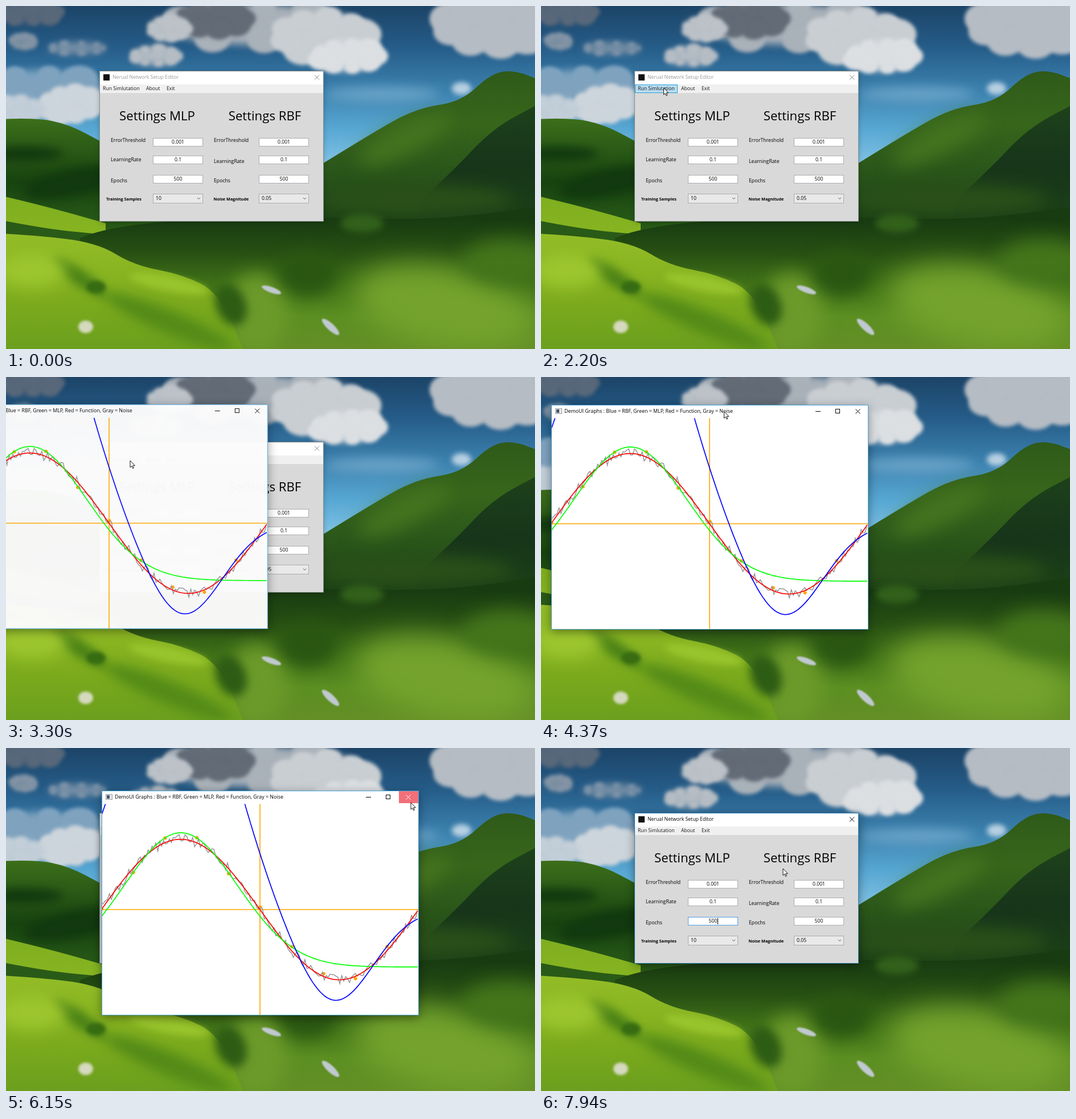
Recreate the animation shown at these times as an HTML page with a canvas. Size 929 by 603 pixels, loop 8 s.

```html
<!DOCTYPE html>
<html lang="en">
<head>
<meta charset="utf-8">
<title>Neural network settings</title>
<style>
html, body { margin: 0; width: 100%; height: 100%; overflow: hidden; }
canvas { display: block; }
</style>
</head>
<body>
<canvas id="stage" width="929" height="603"></canvas>
<script>
const W = 929, H = 603, LOOP = 8000;
const FONT = '"Open Sans", "Noto Sans", sans-serif';
const ctx = document.getElementById('stage').getContext('2d');

function random(seed) {
  return () => (seed = seed * 16807 % 2147483647) / 2147483647;
}

// ---- Landscape, painted once ----
function paintLandscape() {
  const canvas = document.createElement('canvas');
  canvas.width = W;
  canvas.height = H;
  const c = canvas.getContext('2d');
  const rnd = random(2024);

  const shade = (y0, y1, colors) => {
    const g = c.createLinearGradient(0, y0, 0, y1);
    colors.forEach((color, i) => g.addColorStop(i / (colors.length - 1), color));
    return g;
  };
  const patch = (color, x, y, rx, ry, angle = 0, blur = 8) => {
    c.filter = `blur(${blur}px)`;
    c.fillStyle = color;
    c.beginPath();
    c.ellipse(x, y, rx, ry, angle, 0, 7);
    c.fill();
  };
  // A soft base with a few smaller puffs spread over it.
  const cloud = (color, x, y, rx, ry) => {
    patch(color, x, y, rx * .85, ry * .75, 0, 7);
    for (let i = 0; i < 9; i++) {
      const a = i / 9 * 2 * Math.PI, r = ry * (.3 + .25 * rnd());
      patch(color, x + Math.cos(a) * rx * .75, y + Math.sin(a) * ry * .6, r * 1.3, r, 0, 3);
    }
  };
  // Land filled from a smooth skyline down to the bottom edge.
  const land = (colors, top, bottom, ...pts) => {
    c.filter = 'blur(.7px)';
    c.fillStyle = shade(top, bottom, colors);
    c.beginPath();
    c.moveTo(pts[0], H + 9);
    c.lineTo(pts[0], pts[1]);
    for (let i = 2; i < pts.length - 2; i += 2) {
      c.quadraticCurveTo(pts[i], pts[i + 1], (pts[i] + pts[i + 2]) / 2, (pts[i + 1] + pts[i + 3]) / 2);
    }
    c.lineTo(...pts.slice(-2));
    c.lineTo(pts.at(-2), H + 9);
    c.fill();
  };

  c.fillStyle = shade(0, 290, ['#1c4468', '#255c88', '#3b80ad', '#58a8d4', '#8ac8e8']);
  c.fillRect(0, 0, W, H);
  cloud('#7fa3bf', 60, 150, 120, 50);
  cloud('#cdd5dc', 115, 172, 55, 36);
  cloud('#c2ced8', 20, 182, 50, 26);
  cloud('#58687a', 40, 10, 65, 26);
  cloud('#8394a5', 30, 62, 24, 14);
  cloud('#7d93a8', 125, 74, 60, 13);
  cloud('#a9b1b9', 430, 32, 180, 48);
  cloud('#626b76', 365, 22, 70, 34);
  cloud('#b6bdc4', 262, 88, 48, 20);
  cloud('#bcc2c8', 285, 40, 38, 24);
  cloud('#c9ced2', 555, 50, 90, 52);
  cloud('#dcdfe2', 600, 88, 66, 34);
  cloud('#b5bcc4', 855, 34, 105, 56);
  patch('#6ba4c8', 660, 155, 100, 12, 0, 10);
  patch('#b7d0e2', 800, 145, 17, 11, 0, 4);

  land(['#2f5a19', '#37661b', '#29541a', '#1a3d14'], 115, 390,
    540, 287, 640, 225, 720, 180, 800, 168, 850, 120, 890, 112, 940, 131);
  patch('#45751f', 700, 235, 90, 24, -.45, 16);
  land(['#1e421b', '#17351a', '#1d4216'], 170, 390, 725, 345, 785, 290, 855, 215, 940, 170);
  patch('#2b5019', 720, 340, 170, 25, 0, 14);

  land(['#3c6e1a', '#2a5a16', '#17430f', '#245516', '#2c6016'], 198, 420,
    -10, 199, 50, 196, 110, 208, 170, 240, 300, 310);
  patch('#12390f', 30, 260, 70, 13);
  patch('#12390f', 120, 310, 90, 24, -.2);
  land(['#7fae1f', '#86b421'], 333, 400, -10, 333, 70, 352, 175, 382);
  land(['#2a5a17', '#2a5a17'], 370, 420, -10, 376, 70, 392, 175, 402);

  land(['#183b11', '#274f13', '#417218', '#5c8f22', '#648f26'], 375, 603,
    130, 408, 200, 378, 560, 372, 760, 376, 940, 352);
  patch('#32611b', 625, 382, 38, 16, 0, 6);
  patch('#6c9a2a', 440, 540, 55, 70, 0, 16);
  patch('#2a5612', 530, 470, 50, 40, 0, 14);
  patch('#74a22d', 770, 530, 160, 70, .2, 24);
  patch('#44751b', 880, 450, 80, 40, 0, 16);

  land(['#93bd27', '#88b421', '#78a81c', '#6b9f1e'], 400, 603,
    -10, 400, 50, 403, 160, 416, 225, 456, 310, 472, 375, 505, 420, 612);
  patch('#4c8317', 130, 478, 58, 14, .6);
  patch('#548b18', 285, 555, 120, 20, .4, 10);
  patch('#9dc62e', 45, 465, 60, 30, 0, 14);
  patch('#98c42c', 285, 488, 70, 13, .2, 6);
  patch('#376c13', 158, 494, 17, 11, 0, 3);
  patch('#2d5c14', 395, 525, 26, 38, -.4);

  patch('#c0c9cf', 466, 499, 18, 5, .35, 1);
  patch('#c0c9cf', 570, 564, 20, 6, .75, 1);
  patch('#d5d9be', 140, 564, 13, 11, 0, 2);
  return canvas;
}
const landscape = paintLandscape();

// ---- Drawing helpers ----
function text(str, x, y, { size = 8.7, color = '#000', align = 'left', bold = false } = {}) {
  ctx.font = `${bold ? 'bold ' : ''}${size}px ${FONT}`;
  ctx.textAlign = align;
  ctx.textBaseline = 'middle';
  ctx.fillStyle = color;
  ctx.fillText(str, x, y);
}

function box(x, y, w, h, fill, border) {
  ctx.fillStyle = fill;
  ctx.fillRect(x, y, w, h);
  if (border) outline(x, y, w, h, border);
}

function outline(x, y, w, h, color) {
  ctx.strokeStyle = color;
  ctx.lineWidth = 1;
  ctx.strokeRect(x + .5, y + .5, w - 1, h - 1);
}

function line(color, width, ...pts) {
  ctx.strokeStyle = color;
  ctx.lineWidth = width;
  ctx.beginPath();
  for (let i = 0; i < pts.length; i += 2) ctx.lineTo(pts[i], pts[i + 1]);
  ctx.stroke();
}

function cross(x, y, color) {
  line(color, 1, x - 4, y - 4, x + 4, y + 4);
  line(color, 1, x - 4, y + 4, x + 4, y - 4);
}

function frame(x, y, w, h, active) {
  ctx.save();
  ctx.shadowColor = `rgba(0,0,0,${active ? .4 : .22})`;
  ctx.shadowBlur = active ? 16 : 8;
  ctx.shadowOffsetY = active ? 4 : 2;
  box(x, y, w, h, '#fff');
  ctx.restore();
}

const inside = ([x, y], [bx, by, bw, bh]) => x >= bx && x < bx + bw && y >= by && y < by + bh;

// ---- Settings window ----
const FIELDS = [258, 444].flatMap(x =>
  [[232, '0.001'], [263, '0.1'], [297, '500']].map(([y, value]) => ({ rect: [x, y, 88, 15], value })));
const FOCUSED = FIELDS[2];
const RUN_ITEM = [165, 138, 75, 15];

function comboBox(x, value) {
  box(x, 330, 88, 17, '#e9e9e9', '#acacac');
  text(value, x + 5, 339);
  line('#555', 1, x + 78, 337, x + 80.5, 339.5, x + 83, 337);
}

function settingsWindow(t, cursor, hoverable) {
  const active = t >= 2430 && t < 3050 || t >= 7540;
  frame(164, 114, 394, 264, active);
  box(165, 138, 392, 15, '#f0f0f0');
  box(165, 153, 392, 225, '#d9d9d9');
  outline(164, 114, 394, 265, active ? '#2f7fae' : '#8a908d');
  box(171, 120, 11, 11, '#111');
  text('Nerual Network Setup Editor', 187, 126, { color: active ? '#000' : '#999' });
  cross(546, 125.5, active ? '#000' : '#888');

  if (hoverable && t < 2900 && inside(cursor, RUN_ITEM)) box(...RUN_ITEM, '#b9dcee', '#26a0da');
  text('Run Simlutation', 170, 146, { color: '#1a1a1a' });
  text('About', 246, 146, { color: '#1a1a1a' });
  text('Exit', 282, 146, { color: '#1a1a1a' });

  text('Settings MLP', 265.5, 195, { size: 22.2, align: 'center' });
  text('Settings RBF', 454.5, 195, { size: 22.2, align: 'center' });
  [[184, 270.5], [365, 273.5]].forEach(([x, rateY]) => {
    text('ErrorThreshold', x, 237);
    text('LearningRate', x, rateY);
    text('Epochs', x, 308);
  });
  text('Training Samples', 176, 340, { size: 7.3, bold: true });
  text('Noise Magnitude', 364.5, 340, { size: 7.3, bold: true });

  FIELDS.forEach(field => {
    const [x, y] = field.rect;
    const focus = field === FOCUSED && t >= 2430;
    const hover = hoverable && inside(cursor, field.rect);
    box(...field.rect, '#fff', focus ? '#569de5' : hover ? '#7eb4ea' : '#abadb3');
    text(field.value, x + 44, y + 7.5, { align: 'center' });
    if (focus) line('#000', 1, x + 52.5, y + 2, x + 52.5, y + 13);
  });
  comboBox(258, '10');
  comboBox(444, '0.05');
}

// ---- Graph window ----
const GW = 557, GH = 395, MID_X = 278, MID_Y = 209, AMP = 123.5;
const bell = (x, center, width) => Math.exp(-(((x - center) / width) ** 2));
const wave = x => MID_Y + AMP * Math.sin((x - MID_X) / GW * 2 * Math.PI);
const mlp = x => MID_Y + 101 - 236 * bell(x, 139, 141);
const rbf = x => MID_Y - 500 * bell(x, 131, 125) + 163 * bell(x, 408, 97);

function plot(fn, step) {
  const pts = [];
  for (let x = 0; x <= GW; x += step) pts.push(x, fn(x));
  return pts;
}
const noise = random(77);
const GRAPHS = [
  ['#959595', 1.5, ...plot(x => wave(x) + (noise() - .5) * 17, 3.4)],
  ['#f00', 1.7, ...plot(wave, 3)],
  ['#0f0', 1.7, ...plot(mlp, 3)],
  ['#00f', 1.7, ...plot(rbf, 3)],
];
const SAMPLE_ERRORS = [0, 8, -8, -9, 9, -5, -8, -5, 4, -7];

function graphWindow([x, y], alpha, scale, closeColor) {
  ctx.save();
  ctx.globalAlpha = alpha;
  ctx.translate(x + GW / 2, y + GH / 2);
  ctx.scale(scale, scale);
  ctx.translate(-GW / 2, -GH / 2);
  frame(0, 0, GW, GH, true);

  box(7, 6, 12, 10, '#e4e7ea', '#9aa0a6');
  box(9, 8, 5, 6, '#4a5568');
  text('DemoUI Graphs : Blue = RBF, Green = MLP, Red = Function, Gray = Noise', 23, 12, { size: 8.9 });
  line('#000', 1, 464, 11.5, 473, 11.5);
  outline(499, 7, 8, 8, '#000');
  if (closeColor) box(522, 0, 34, 22, closeColor);
  cross(538.5, 11.5, closeColor ? '#fff' : '#000');

  ctx.save();
  ctx.beginPath();
  ctx.rect(0, 23.5, GW, GH - 24);
  ctx.clip();
  line('#ffa500', 1.6, 0, MID_Y, GW, MID_Y);
  line('#ffa500', 1.6, MID_X, 23, MID_X, GH);
  ctx.fillStyle = '#ffa500';
  SAMPLE_ERRORS.forEach((error, i) => {
    const sx = i * GW / 10;
    ctx.beginPath();
    ctx.arc(sx, wave(sx) + error, 3, 0, 7);
    ctx.fill();
  });
  GRAPHS.forEach(graph => line(...graph));
  ctx.restore();

  outline(0, 0, GW, GH, '#4aa3d8');
  ctx.restore();
}

// ---- Motion ----
// Progress in n equal jumps; the first at t0, the last at t1.
function steps(t, t0, t1, n) {
  if (t < t0) return 0;
  return Math.min(1, (Math.floor((t - t0) / (t1 - t0) * (n - 1) + .01) + 1) / n);
}
const mix = (a, b, p) => a + (b - a) * p;
const mixPoint = (a, b, p) => [mix(a[0], b[0], p), mix(a[1], b[1], p)];
const smooth = p => p * p * (3 - 2 * p);
const ease = (p, delay, rush) => 1 - (1 - p ** delay) ** rush;

// The hand pulls sideways first, then down.
function graphPlace(t) {
  const p = steps(t, 4290, 4830, 8);
  return [Math.round(mix(-97, 168, ease(p, 1.2, 2.7))), Math.round(mix(48, 75, ease(p, 4, 5.4)))];
}

function cursorPlace(t, win) {
  const grip = [win[0] + 303.5, win[1] + 11.5];
  if (t < 1590) return mixPoint([860, 668], [505, 303], steps(t, 1040, 1270, 4));
  if (t < 2430) return mixPoint([505, 303], [215.5, 144], smooth(steps(t, 1590, 2200, 9)));
  if (t < 4290) return mixPoint([218, 147], grip, smooth(steps(t, 3530, 4140, 9)));
  if (t < 7540) return mixPoint(grip, [711, 96], smooth(steps(t, 5230, 5840, 9)));
  return mixPoint([711, 96], [425, 212], smooth(steps(t, 7540, 7940, 6)));
}

const ARROW = new Path2D('M0 0V12L2.8 9.5 4.6 13.7 6.4 12.9 4.6 8.8H8.4Z');
function drawCursor([x, y], beam) {
  ctx.save();
  ctx.translate(x, y);
  if (beam) {
    line('#000', 1, .5, -6, .5, 6);
    line('#000', 1, -2, -6.5, 3, -6.5);
    line('#000', 1, -2, 6.5, 3, 6.5);
  } else {
    ctx.fillStyle = '#fff';
    ctx.fill(ARROW);
    ctx.strokeStyle = '#000';
    ctx.lineWidth = .9;
    ctx.stroke(ARROW);
  }
  ctx.restore();
}

function draw(t) {
  const win = graphPlace(t);
  const cursor = cursorPlace(t, win);
  const open = steps(t, 3050, 3370, 5);
  const close = Math.min(1, 2 * steps(t, 7540, 7940, 6));
  const hoverable = t >= 1040 && (t < 3050 || t >= 7540);

  ctx.drawImage(landscape, 0, 0);
  settingsWindow(t, cursor, hoverable);
  if (open > 0 && close < 1) {
    const overClose = inside(cursor, [win[0] + 522, win[1], 35, 23]);
    const closeColor = t >= 6150 ? '#f1707a' : overClose ? '#e81123' : null;
    const alpha = ease(open, 1, 2) * (1 - close);
    graphWindow(win, alpha, mix(.9, 1, ease(open, 1, 3)) - .1 * close, closeColor);
  }
  if (t >= 1040) drawCursor(cursor, hoverable && FIELDS.some(f => inside(cursor, f.rect)));
}

const start = performance.now();
function tick() {
  draw((performance.now() - start) % LOOP);
  requestAnimationFrame(tick);
}
tick();
</script>
</body>
</html>
```
